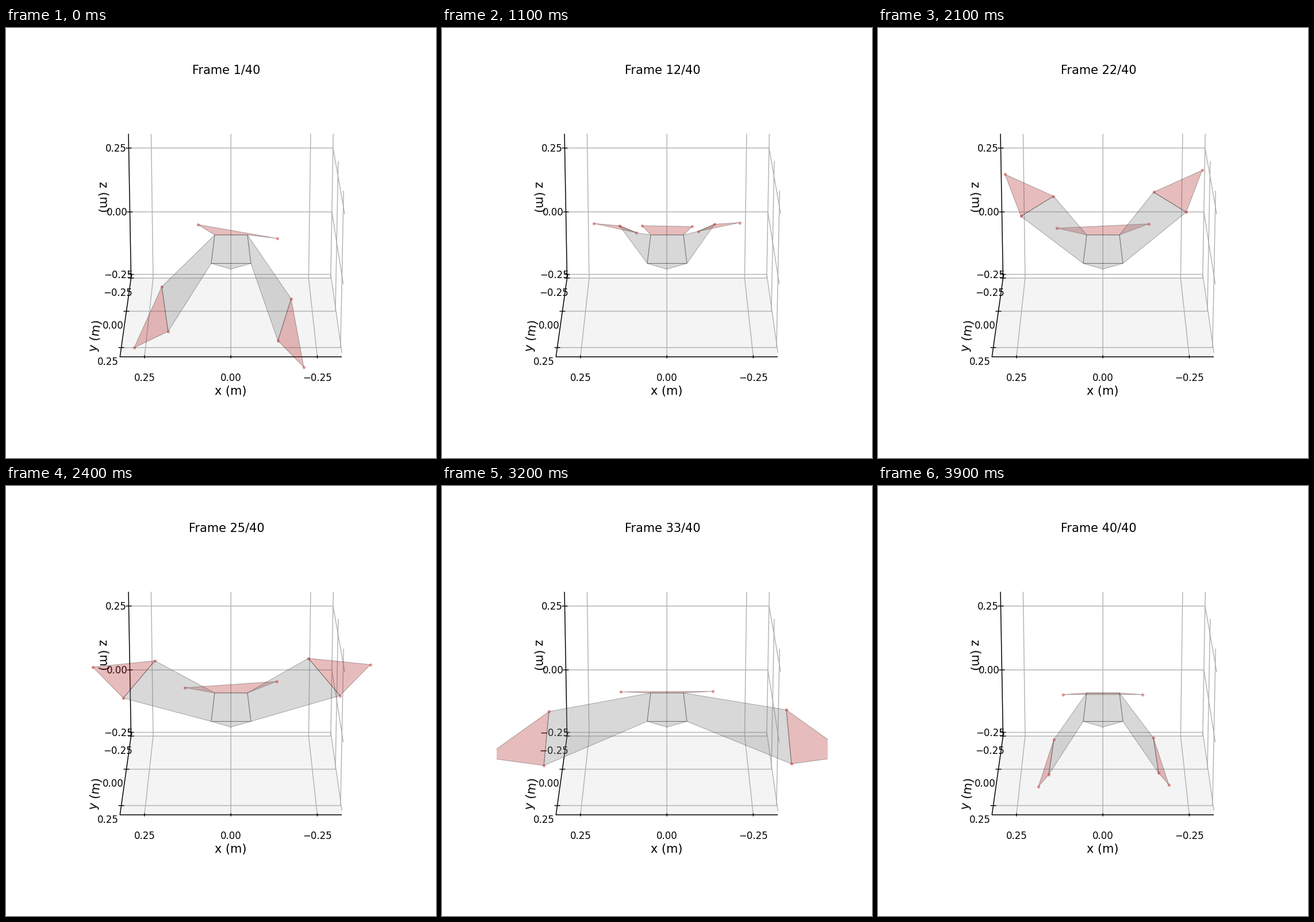
These frames come from a looping animation (748x748 px, 4 s). A matplotlib script:

```python
import numpy as np
import matplotlib.pyplot as plt
from matplotlib.animation import FuncAnimation
from matplotlib.patches import Polygon, Rectangle

SIZE, DPI, FRAMES = 748, 88, 40
PX = 72 / DPI      # points per pixel
BEAT = 37          # frames in one wing beat
MIRROR = 785       # x of a wing point plus x of its mirror image
SIDE, BACK, FRONT, FLOOR, TOP = 0.321, -0.25, 0.31, -0.265, 0.305
TICKS = (-0.25, 0, 0.25)
GREY, RED = (0.5, 0.5, 0.5, 0.3), (0.698, 0.133, 0.133, 0.3)

plt.rcParams["font.family"] = "DejaVu Sans"
fig = plt.figure(figsize=(SIZE / DPI, SIZE / DPI), dpi=DPI, facecolor="white")
ax = fig.add_axes([0, 0, 1, 1])
ax.set_xlim(0, SIZE)
ax.set_ylim(SIZE, 0)
ax.axis("off")
view = Rectangle((95.35, 89.8), 576, 576, transform=ax.transData)


def project(x, y, z):
    """Perspective view of a point in metres, in pixels."""
    y, z = y - BACK, z - FLOOR
    w = 1 - 0.1786 * y - 0.0443 * z
    return 391.2 - 541 * x / w, (435 + 142.5 * y - 448.5 * z) / w


def line(points, color="#b0b0b0", width=1.4):
    x, y = zip(*points)
    ax.plot(x, y, color=color, lw=width * PX, solid_capstyle="butt",
            solid_joinstyle="round", snap=False, zorder=1)


def tick(point, arm, shift, value):
    """Short mark along arm, with its number at a shift from the axis."""
    (x, y), (dx, dy) = point, arm
    line([(x - dx, y - dy), (x + dx, y + dy)], "black")
    text = f"{value:.2f}".replace("-", "\u2212")
    ax.text(x + shift[0], y + shift[1] + 6.1, text, size=16.67 * PX,
            ha="center", va="baseline", zorder=1)


def axis_label(x, y, text, angle=0):
    ax.text(x, y, text, size=20.83 * PX, ha="center", va="center",
            rotation=angle, rotation_mode="anchor", zorder=1)


def draw_box():
    floor = [project(x, y, FLOOR) for x, y in
             [(SIDE, BACK), (-SIDE, BACK), (-SIDE, FRONT), (SIDE, FRONT)]]
    ax.add_patch(Polygon(floor, fc="#f4f4f4", ec="none", zorder=0))
    for v in TICKS:
        line([project(v, BACK, TOP), project(v, BACK, FLOOR), project(v, FRONT, FLOOR)])
        line([project(SIDE, v, FLOOR), project(-SIDE, v, FLOOR), project(-SIDE, v, TOP)])
        line([project(SIDE, BACK, v), project(-SIDE, BACK, v), project(-SIDE, FRONT, v)])
    line([project(SIDE, BACK, TOP), project(SIDE, BACK, FLOOR),
          project(SIDE, FRONT, FLOOR), project(-SIDE, FRONT, FLOOR)], "black", 1.5)
    for v in TICKS:
        tick(project(v, FRONT, FLOOR), (0, 2.7), (0, 36), v)
        tick(project(SIDE, v, FLOOR), (5, 0), (-23, 24.5), v)
        tick(project(SIDE, BACK, v), (5, 0), (-22, 0), v)
    axis_label(391, 632, "x (m)")
    axis_label(156.5, 535, "y (m)", 81.7)
    axis_label(169, 294, "z (m)", -88.9)


# Left wing over one beat, by frame: front wrist, rear wrist, tip
POSES = {
    0: [(271, 450), (282, 528), (223, 556)],
    2: [(306, 441), (297, 502), (279, 523)],
    6: [(324, 402), (312, 446), (302, 480)],
    11: [(338, 356), (309, 344), (264, 340)],
    18: [(344, 296), (293, 301), (284, 220)],
    24: [(259, 304), (204, 369), (151, 315)],
    28: [(214, 345), (182, 428), (110, 393)],
    35: [(213, 428), (218, 518), (122, 526)],
}
DROOP = np.array([(-18, 24), (-30, 19), (-44, 37)])  # right wing at the start
TOP_L, TOP_R = (363, 360), (420, 360)
LOW_L, LOW_R, NOSE = (357, 409.5), (426, 409.5), (391, 419.5)


def bump(t, centre, width):
    return np.exp(-((t - centre) / width) ** 2)


def left_wing(f):
    """Smooth periodic curve through the poses."""
    keys, poses = np.array(list(POSES)), np.array(list(POSES.values()), float)
    t = np.concatenate([keys - BEAT, keys, keys + BEAT]).astype(float)
    p = np.concatenate([poses] * 3)
    m = np.gradient(p, t, axis=0)
    i = np.searchsorted(t, f, side="right") - 1
    h = t[i + 1] - t[i]
    s = (f - t[i]) / h
    return (p[i] * (1 + 2 * s) * (1 - s) ** 2 + m[i] * h * s * (1 - s) ** 2
            + p[i + 1] * s ** 2 * (3 - 2 * s) + m[i + 1] * h * s ** 2 * (s - 1))


def right_wing(f):
    """Mirrored left wing, held slightly higher, drooping at the start."""
    lift = 3 + 6 * bump(f, 18, 5)
    return left_wing(f) * [-1, 1] + [MIRROR, -lift] + DROOP * np.exp(-f / 4)


def tail_tips(f):
    """The tail fans, pitches and rolls, settling from an early roll."""
    start = np.exp(-f / 4)
    x = 391 + 12 * start
    y = 344 + 10 * start + 20 * bump(f, 37, 8)
    half = 80 - 36 * bump(f, 11, 4) - 11 * bump(f, 39, 3) - 11 * start
    roll = 12 * start - 5.5 * bump(f, 24, 5)
    return np.array([(x - half, y - roll), (x + half, y + roll)])


def face(color, points=((0, 0),) * 3):
    patch = Polygon(points, fc=color, ec=(0, 0, 0, 0.3), lw=1.0 * PX,
                    joinstyle="round", zorder=2)
    ax.add_patch(patch)
    patch.set_clip_path(view)
    return patch


draw_box()
tail_face = face(RED)
arms = [face(GREY), face(GREY)]
face(GREY, [TOP_L, TOP_R, LOW_R, LOW_L])
face(GREY, [LOW_L, LOW_R, NOSE])
hands = [face(RED), face(RED)]
dots, = ax.plot([], [], "o", ms=5.4 * PX, mfc=(0.78, 0.15, 0.15, 0.45),
                mec="none", zorder=3)
dots.set_clip_path(view)
title = ax.text(383.4, 79.8, "", size=20.83 * PX, ha="center", va="baseline")


def update(f):
    left, right, tail = left_wing(f), right_wing(f), tail_tips(f)
    tail_face.set_xy([TOP_L, *tail, TOP_R])
    sides = [(left, TOP_L, LOW_L), (right, TOP_R, LOW_R)]
    for arm, hand, (wing, top, low) in zip(arms, hands, sides):
        arm.set_xy([top, wing[0], wing[1], low])
        hand.set_xy(wing)
    dots.set_data(*np.vstack([left, right, tail]).T)
    title.set_text(f"Frame {f + 1}/{FRAMES}")
    return [tail_face, *arms, *hands, dots, title]


anim = FuncAnimation(fig, update, frames=FRAMES, interval=100,
                     repeat=True, repeat_delay=0, blit=False)
plt.show()
```
